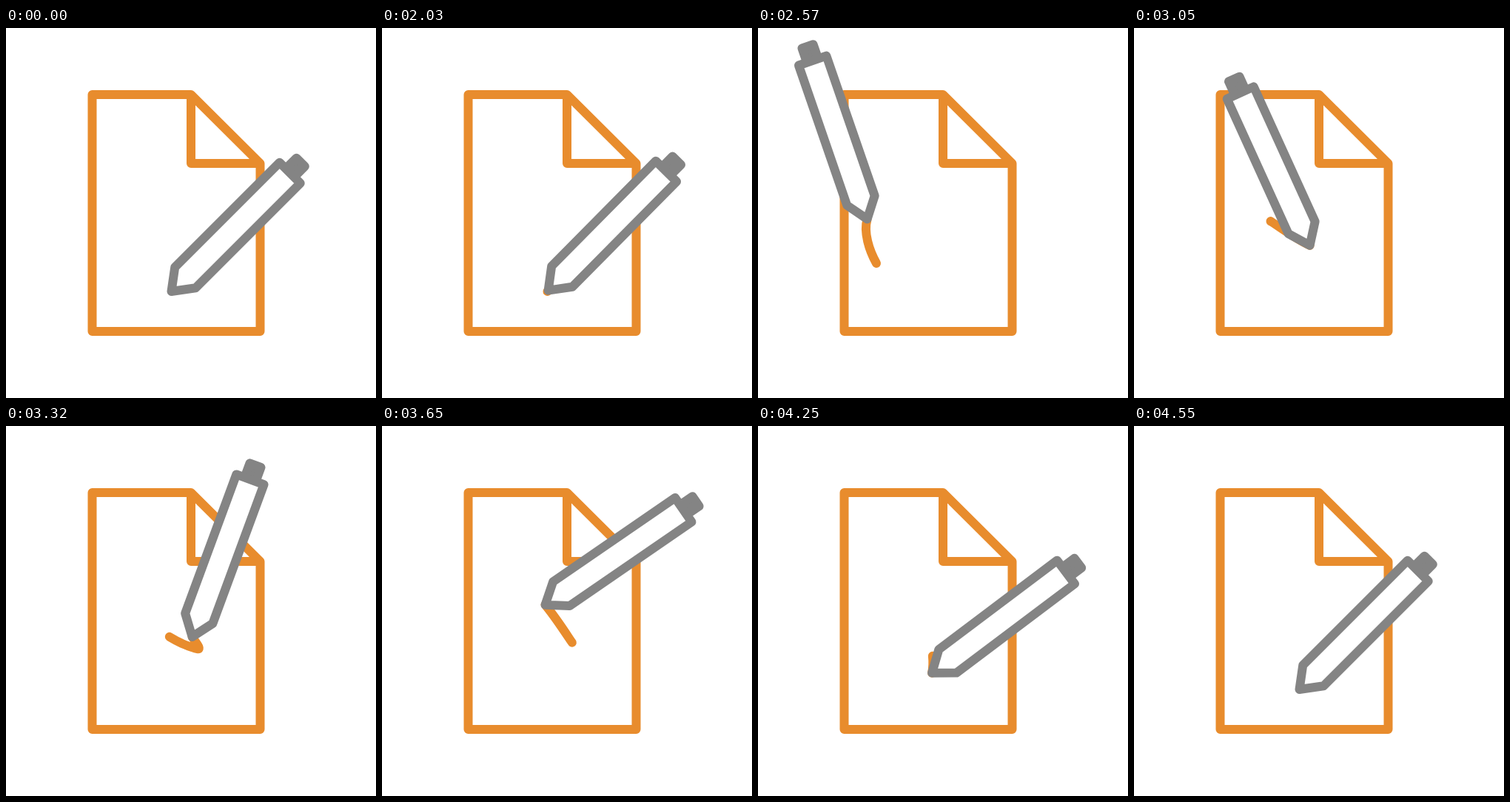
An HTML page without scripts for the animation above (4640 ms loop, 500 by 500 pixels).

```html
<!DOCTYPE html>
<html lang="en">
<head>
<meta charset="utf-8">
<title>Pen writing on a page</title>
<style>
  /* Animated state: percent written, trail length in percent, pen angle */
  @property --done { syntax: "<number>"; inherits: true; initial-value: 0; }
  @property --trail { syntax: "<number>"; inherits: true; initial-value: 13.2; }
  @property --tilt { syntax: "<angle>"; inherits: true; initial-value: 45deg; }

  html, body { margin: 0; width: 100%; height: 100%; overflow: hidden; background: #fff; }
  svg {
    --route: path("M223.5 356C235 344 185 362 160 318C150 300 142 275 148 257\
C152 245 170 252 186 262C200 271 220 286 238 294C262 304 266 305 255 290\
C245 275 234 258 220 241C214 236 215 246 217 253C221 266 226 280 232 291\
C238 312 240 340 223.5 356");
    display: block; width: 100%; height: 100%;
    animation: 4640ms linear infinite;
    animation-name: write, sway;
  }
  path { fill: none; stroke-width: 12; stroke-linecap: round; stroke-linejoin: round; }
  .page, .ink { stroke: #e88c2d; }
  .ink {
    d: var(--route);
    stroke-dasharray: calc(var(--trail) * 1px) 200px;
    stroke-dashoffset: calc((var(--trail) - var(--done)) * 1px);
  }
  .pen {
    stroke: #848484;
    transform-origin: 0 0;
    offset-path: var(--route);
    offset-distance: calc(var(--done) * 1%);
    offset-rotate: 0deg;
    transform: rotate(var(--tilt));
  }
  .body { fill: #fff; }
  .cap { fill: #848484; }

  @keyframes write {
    0% { --done: 0; }
    43.1% { --done: 0; animation-timing-function: cubic-bezier(.4, .06, .7, .6); }
    55.4% { --done: 30.3; animation-timing-function: cubic-bezier(.3, .45, .7, .75); }
    65.7% { --done: 52.5; }
    78.7% { --done: 73; }
    86.4% { --done: 85.5; --trail: 13.2; animation-timing-function: ease-out; }
    98%, 100% { --done: 100; --trail: 0; }
  }
  @keyframes sway {
    0% { --tilt: 45deg; }
    43.1% { --tilt: 45deg; animation-timing-function: cubic-bezier(.4, 0, .8, .8); }
    55.4% { --tilt: -19deg; animation-timing-function: cubic-bezier(.25, 2.1, .6, 1.9); }
    65.7% { --tilt: -24.7deg; animation-timing-function: cubic-bezier(.3, .2, .6, 1); }
    78.7% { --tilt: 55.5deg; animation-timing-function: ease-out; }
    86.4% { --tilt: 58.7deg; animation-timing-function: ease-in-out; }
    98%, 100% { --tilt: 45deg; }
  }
</style>
</head>
<body>
<svg viewBox="0 0 500 500">
  <path class="page" d="M116.5 90H250L343.5 183V410H116.5ZM250 90V183H343.5"/>
  <path class="ink" pathLength="100"/>
  <!-- Upright pen with its tip at the origin -->
  <g class="pen">
    <path class="cap" d="M-8 -227V-247H8V-227Z"/>
    <path class="body" d="M0 0L-19.8 -26.5V-226.6H19.8V-26.5Z"/>
  </g>
</svg>
</body>
</html>
```
